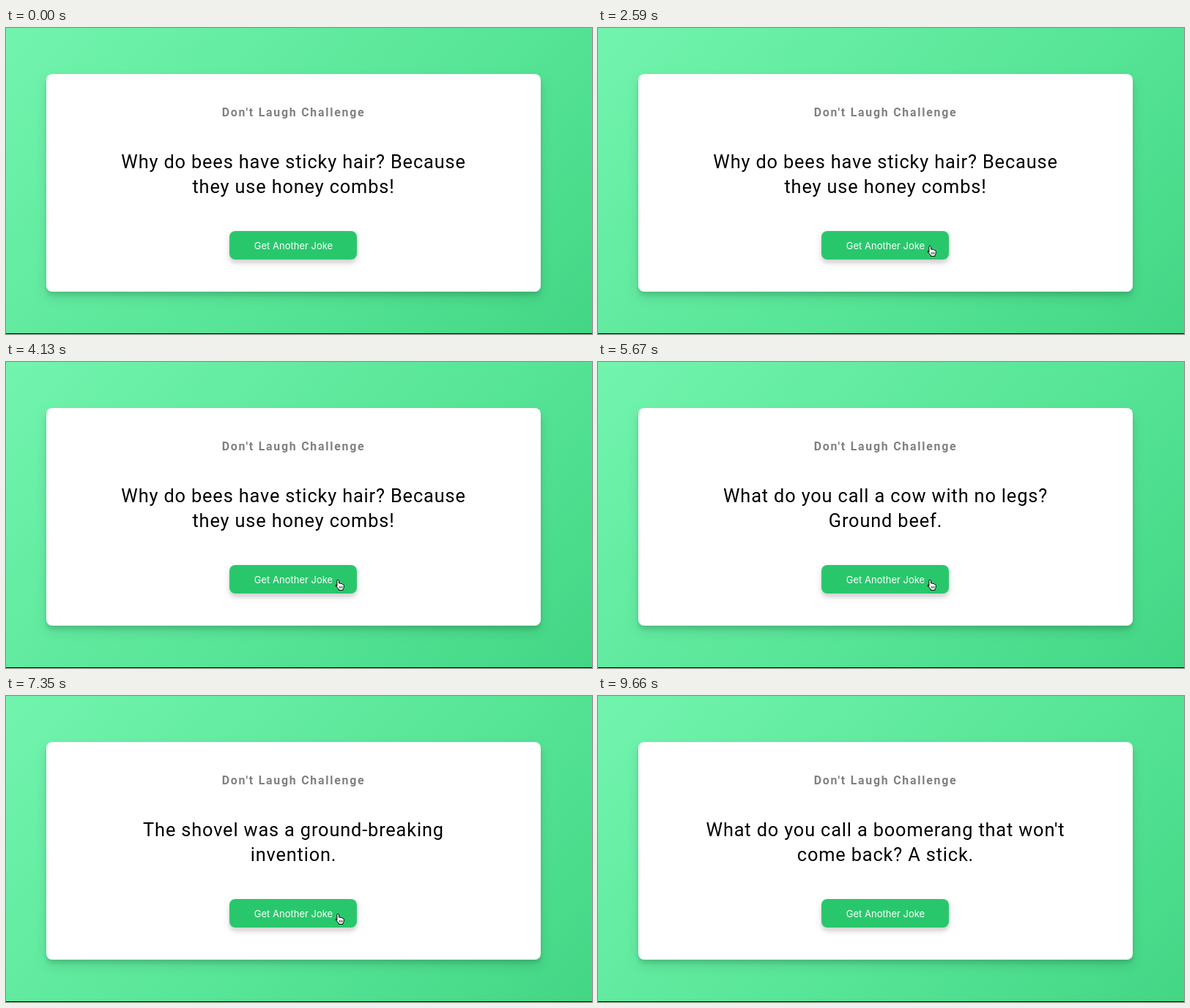
An HTML page for the animation above (9.73 s loop, 800 by 419 pixels).

```html
<!DOCTYPE html>
<html lang="en">
<head>
<meta charset="utf-8">
<title>Joke card</title>
<style>
  html, body { margin: 0; width: 100%; height: 100%; overflow: hidden; }
  body { position: relative; background: linear-gradient(135deg, #72f4ae, #56e496 60%, #43d685); }
  div, svg { position: absolute; box-sizing: border-box; }
  .card {
    left: 55px; top: 63px; width: 675px; height: 298px; border-radius: 8px; background: #fff;
    box-shadow: 0 8px 17px rgba(0, 0, 0, .1), 0 5px 5px rgba(0, 0, 0, .1);
  }
  .button {
    left: 305px; top: 278px; width: 174px; height: 39px; border-radius: 8px; background: #29c76c;
    box-shadow: 0 4px 12px rgba(0, 0, 0, .1), 0 5px 5px rgba(0, 0, 0, .1);
  }
  .edge { left: 0; top: 418px; width: 100%; height: 1px; background: #000; }
  svg { left: 0; top: 0; }
  text { font-family: Roboto, sans-serif; text-anchor: middle; }
  .title { font-size: 15.9px; font-weight: 700; letter-spacing: 1.75px; fill: #808080; }
  .joke { font-size: 25.35px; letter-spacing: .845px; }
  .label { font: 13px Inter, sans-serif; fill: #fff; }
</style>
</head>
<body>
<div class="card"></div>
<div class="button"></div>
<svg width="800" height="419">
  <text class="title" x="392.5" y="121">Don't Laugh Challenge</text>
  <text class="joke" id="line1" x="392.5" y="192"></text>
  <text class="joke" id="line2" x="392.5" y="225.5"></text>
  <text class="label" x="392.5" y="302.5">Get Another Joke</text>
  <circle id="ring" cx="454.5" cy="298" fill="none" stroke="#79a9dc"/>
  <g id="cursor" stroke-linejoin="round">
    <path id="arrow" d="M0 0V11.6L2.7 9.1 4.6 13.4 6.6 12.5 4.8 8.4H8.3Z" fill="#000" stroke="#fff" stroke-width=".9"/>
    <g id="hand" stroke="#000" stroke-width="1" stroke-linecap="round">
      <path d="M-1.6 8.5V1.2Q-1.5 0 -.4 0 .7 0 .9 1.2L1.3 4.8Q2.8 3.9 3.6 5.2 5 4.6 5.8 6 7.7 5.6 7.8 7.4V9.6Q7.6 11.6 6.6 12.4V14H.8V12.6L-3.4 8.4Q-4 7.1 -2.9 6.9Z" fill="#fff" transform="translate(0 .4)"/>
      <path d="M1.9 9.2V11.6M3.7 9.2V11.6M5.5 9.2V11.6" stroke-width=".7"/>
    </g>
  </g>
</svg>
<div class="edge"></div>
<script>
const LOOP = 9730, STEP = 70, RING_TIME = 350;
const $ = id => document.getElementById(id);

const jokes = [
  [0, "Why do bees have sticky hair? Because", "they use honey combs!"],
  [4200, "What do you call a cow with no legs?", "Ground beef."],
  [6370, "The shovel was a ground-breaking", "invention."],
  [8120, "What do you call a boomerang that won't", "come back? A stick."]
];
const clicks = [3780, 5950, 7700];

// Pointer tip: time, x, y
const path = [
  [1540, 424, 421], [1820, 441, 316], [2450, 453.5, 298],
  [8330, 453.5, 298], [8680, 428, 421]
];

function pointerAt(t) {
  const i = path.findIndex(p => p[0] > t);
  if (i < 1) return null;
  const [t0, x0, y0] = path[i - 1], [t1, x1, y1] = path[i];
  const p = (t - t0) / (t1 - t0);
  const k = i < 4 ? 1 - (1 - p) ** 2 : p * p;
  return [x0 + (x1 - x0) * k, y0 + (y1 - y0) * k];
}

const show = (el, on) => el.setAttribute("display", on ? "inline" : "none");

function draw(t) {
  const [, first, second] = jokes.filter(j => j[0] <= t).pop();
  $("line1").textContent = first;
  $("line2").textContent = second;

  const click = clicks.find(c => t >= c && t < c + RING_TIME);
  show($("ring"), click !== undefined);
  if (click !== undefined) {
    const p = (t - click) / RING_TIME;
    $("ring").setAttribute("r", 6 + 35 * p);
    $("ring").setAttribute("opacity", 1.1 - p);
  }

  const tip = pointerAt(t);
  show($("cursor"), tip);
  if (tip) {
    const over = tip[1] < 316;
    $("cursor").setAttribute("transform", `translate(${tip})`);
    show($("hand"), over);
    show($("arrow"), !over);
  }
}

const start = performance.now();
function frame() {
  const t = (performance.now() - start) % LOOP;
  draw(Math.floor(t / STEP) * STEP);
  requestAnimationFrame(frame);
}
frame();
</script>
</body>
</html>
```
